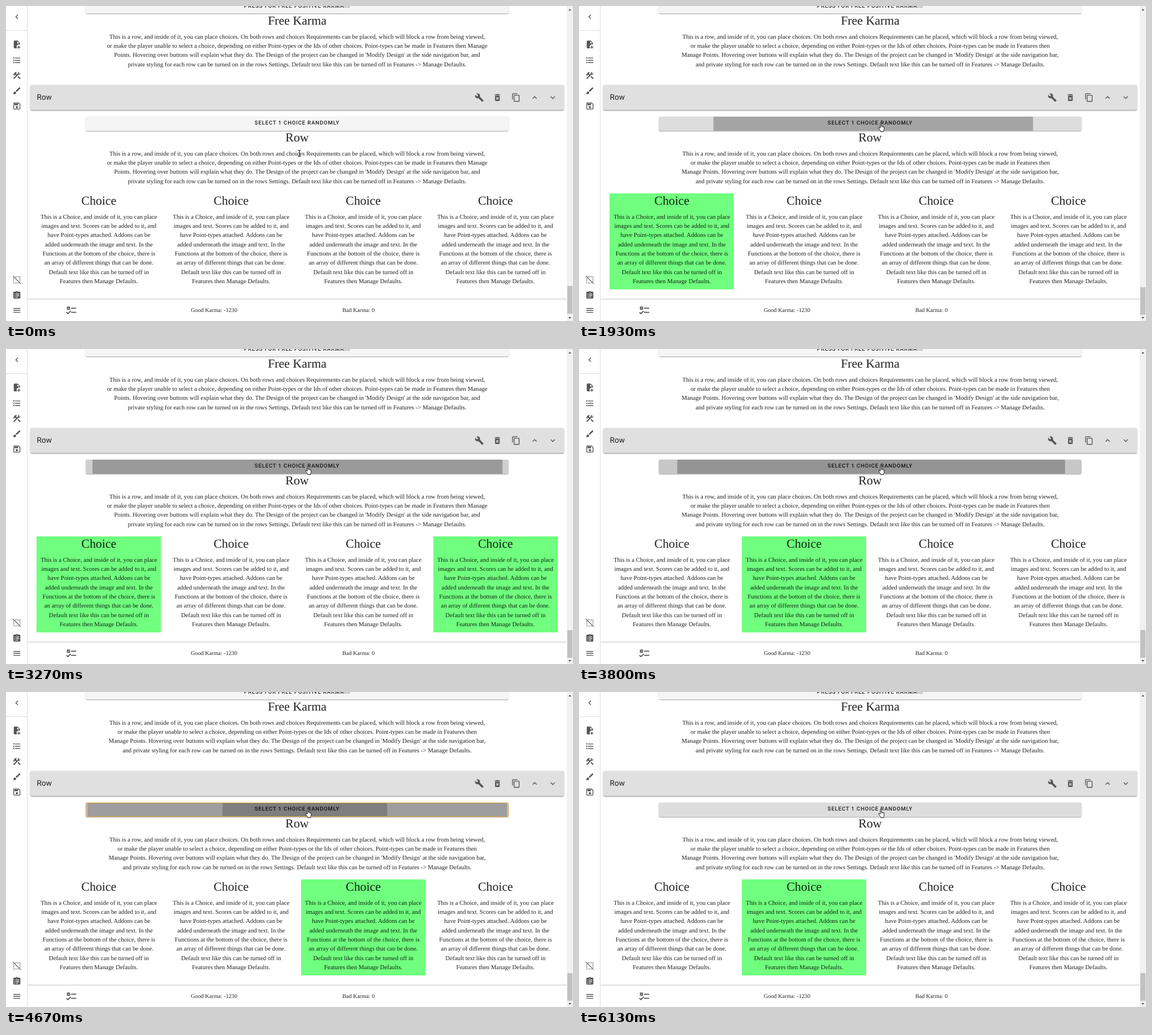
An HTML page for the animation above (6540 ms loop, 1003 by 558 pixels).

```html
<!DOCTYPE html>
<html lang="en">
<head>
<meta charset="utf-8">
<title>Random choice row</title>
<style>
html, body { margin: 0; width: 100%; height: 100%; overflow: hidden; background: #fff; }
#stage { position: absolute; left: 0; top: 0; width: 1003px; height: 558px; overflow: hidden; color: rgba(0,0,0,.87);
  font-family: "Liberation Serif", "Times New Roman", serif; text-rendering: geometricPrecision; }
#stage div, #stage svg { position: absolute; }
.text { font-size: 10.9px; line-height: 16.34px; text-align: center; white-space: nowrap; }
.title { font-size: 21.85px; line-height: 26px; text-align: center; white-space: nowrap; }
.wide { left: 141px; width: 748px; }
.btn { height: 24.5px; border-radius: 2.5px; background: #f5f5f5;
  box-shadow: 0 2px .7px -1.4px rgba(0,0,0,.2), 0 1.4px 1.4px rgba(0,0,0,.14), 0 .7px 3.4px rgba(0,0,0,.12); }
.label { width: 100%; text-align: center; white-space: nowrap; line-height: 24.5px;
  font-family: Roboto, sans-serif; font-weight: 500; font-size: 9.56px; letter-spacing: .0893em; }
.clip { inset: 0; overflow: hidden; border-radius: 2.5px; }
.ripple { left: -374.2px; top: -374.2px; width: 748.4px; height: 748.4px; border-radius: 50%; background: #000; opacity: 0; }
#ring { inset: 0; box-sizing: border-box; border: 1px solid #d79a35; border-radius: 2px; }
.choice { top: 332px; width: 220px; height: 170px; }
.choice .title { top: 0; width: 100%; }
.choice .text { top: 33.5px; width: 100%; }
#panel { left: 43px; top: 140px; width: 944px; height: 44px; background: #e0e0e0; border-radius: 2.5px;
  box-shadow: 0 2px .7px -1.4px rgba(0,0,0,.2), 0 1.4px 1.6px rgba(0,0,0,.2), 0 .7px 3.6px rgba(0,0,0,.2); }
#panel div { left: 11.5px; line-height: 44px; font: 13.6px/44px Roboto, sans-serif; }
#side { left: 0; top: 0; width: 37px; height: 558px; background: #fff; border-right: 1px solid #dedede; }
#side div { left: 0; top: 43px; width: 37px; height: 1px; background: #dedede; }
#foot { left: 38px; top: 520px; width: 954px; height: 38px; background: #fff; box-shadow: 0 -1px 2px rgba(0,0,0,.25); }
#foot div { top: 0; width: 120px; text-align: center; font-size: 10.2px; line-height: 39px; }
#bar { left: 992px; top: 0; width: 11px; height: 558px; background: #f1f1f1; }
#thumb { left: 1px; width: 9px; height: 49px; background: #c1c1c1; }
</style>
</head>
<body>
<div id="stage">
  <div class="btn wide" style="top:-11.5px"><div class="label">PRESS FOR FREE POSITIVE KARMA!!!</div></div>
  <div class="title wide" style="top:13px">Free Karma</div>
  <div class="text wide intro" style="top:46.8px"></div>
  <div id="panel"><div>Row</div></div>
  <div class="btn wide" id="pick" style="top:196px">
    <div class="clip" id="ripples"></div>
    <div id="ring"></div>
    <div class="label">SELECT 1 CHOICE RANDOMLY</div>
  </div>
  <div class="title wide" style="top:220.3px">Row</div>
  <div class="text wide intro" style="top:253.5px"></div>
  <div id="foot"><div style="left:270px">Good Karma: -1230</div><div style="left:525.5px">Bad Karma: 0</div></div>
  <div id="side"><div></div></div>
  <div id="bar">
    <div id="thumb"></div>
    <svg width="11" height="558" fill="#505050"><path d="M3 8h5L5.500 5zM3 551h5l-2.500 3z"/></svg>
  </div>
  <svg id="beam" width="8" height="14" viewBox="-4 -7 8 14" fill="none" stroke="#111" stroke-width="1.1"><path d="M-2.500-5.500Q0-5.500 0-4Q0-5.500 2.500-5.500M0-4.500V4.500M-2.500 5.500Q0 5.500 0 4Q0 5.500 2.500 5.500"/></svg>
  <svg id="hand" width="12" height="18" viewBox="-1 -1 12 18" fill="#fff" stroke="#111" stroke-width=".9" stroke-linejoin="round">
    <path d="M3 9V1.300Q3 .3 3.900 .3T4.800 1.300V5.500Q6.500 5 6.600 6Q8.200 5.600 8.300 6.700Q9.800 6.400 9.800 7.800V11Q9.800 12.500 8.800 13.500V15.500H3.500V14Q2 12.500 .8 10.500L.2 9.200Q0 8 1 8Q2 8 3 9.800"/>
    <path d="M4.800 5.500V8M6.600 6V8.200M8.300 6.700V8.500" stroke-width=".6"/>
  </svg>
</div>
<script>
const $ = id => document.getElementById(id);
const stage = $('stage');

const intro = 'This is a row, and inside of it, you can place choices. On both rows and choices Requirements can be placed, which will block a row from being viewed,<br>' +
  'or make the player unable to select a choice, depending on either Point-types or the Ids of other choices. Point-types can be made in Features then@Manage#' +
  'Points. Hovering over buttons will explain what they do. The Design of the project can be changed in \'Modify Design\' at the side navigation bar,@and#' +
  'private styling for each row can be turned on in the rows Settings. Default text like this can be turned off in Features -&gt; Manage Defaults.';
// The last word of two lines moves down when the row gets narrower.
const wideText = intro.replace(/@/g, ' ').replace(/#/g, '<br>');
const narrowText = intro.replace(/@/g, '<br>').replace(/#/g, ' ');
const intros = document.querySelectorAll('.intro');

const choiceText = ['This is a Choice, and inside of it, you can place', 'images and text. Scores can be added to it, and',
  'have Point-types attached. Addons can be', 'added underneath the image and text. In the',
  'Functions at the bottom of the choice, there is', 'an array of different things that can be done.',
  'Default text like this can be turned off in', 'Features then Manage Defaults.'].join('<br>');

function add(parent, cls) {
  const el = document.createElement('div');
  el.className = cls;
  parent.append(el);
  return el;
}
const choices = [0, 1, 2, 3].map(i => {
  const el = add(stage, 'choice');
  el.style.left = 54.3 + 233.85 * i + 'px';
  el.innerHTML = `<div class="title">Choice</div><div class="text">${choiceText}</div>`;
  return el;
});

function icon(x, y, d, size = 16.4, color = '#555') {
  stage.insertAdjacentHTML('beforeend',
    `<svg viewBox="0 0 24 24" width="${size}" height="${size}" style="left:${x - size / 2}px;top:${y - size / 2}px" fill="${color}" fill-rule="evenodd"><path d="${d}"/></svg>`);
}
icon(837, 162, 'M22.7 19l-9.1-9.1c.9-2.3.4-5-1.5-6.9-2-2-5-2.4-7.4-1.3L9 6 6 9 1.6 4.7C.4 7.1.9 10.1 2.9 12.1c1.9 1.9 4.6 2.4 6.9 1.5l9.1 9.1c.4.4 1 .4 1.4 0l2.3-2.3c.5-.4.5-1.1.1-1.4z');
icon(869.5, 162, 'M6 19c0 1.1.9 2 2 2h8c1.1 0 2-.9 2-2V7H6zM8.460 11.880l1.410-1.410L12 12.590l2.120-2.120 1.410 1.410L13.410 14l2.120 2.120-1.410 1.410L12 15.410l-2.120 2.120-1.410-1.410L10.590 14zM15.500 4l-1-1h-5l-1 1H5v2h14V4z');
icon(902, 162, 'M16 1H4c-1.1 0-2 .9-2 2v14h2V3h12zM19 5H8c-1.1 0-2 .9-2 2v14c0 1.1.9 2 2 2h11c1.1 0 2-.9 2-2V7c0-1.1-.9-2-2-2zM19 21H8V7h11z');
icon(935, 162, 'M12 8l-6 6 1.410 1.410L12 10.830l4.590 4.580L18 14z');
icon(967.3, 162, 'M16.590 8.590L12 13.170 7.410 8.590 6 10l6 6 6-6z');
const sideIcons = [
  [19, 'M15.410 7.410L14 6l-6 6 6 6 1.410-1.410L10.830 12z'],
  [68, 'M13 9h5.500L13 3.500zM6 2h8l6 6v4.500a6 6 0 0 0-7 9.500H6a2 2 0 0 1-2-2V4a2 2 0 0 1 2-2M18 15v3h3v2h-3v3h-2v-3h-3v-2h3v-3z'],
  [96, 'M7 5h14v2H7zM7 11h14v2H7zM7 17h14v2H7zM2.500 4.500h3v3h-3zM2.500 10.500h3v3h-3zM2.500 16.500h3v3h-3z'],
  [123, 'M13.800 15.200l2.100-2.100 6 6-2.100 2.100zM17.500 10a3.500 3.500 0 0 0 3.200-4.900l-2.700 2.700-1.800-1.800 2.700-2.700A3.500 3.500 0 0 0 14.100 7.700l-1.850 1.850-1.800-1.800.7-.7-1.400-1.400L11.900 3.500a3 3 0 0 0-4.250 0L4.100 7.100l1.400 1.400H2.700l-.7.7 3.500 3.500.7-.7V9.200l1.400 1.400.7-.7 1.800 1.800-7.400 7.400 2.100 2.100L16.300 9.700c.4.2.8.3 1.200.3z'],
  [150, 'M20.700 4.600l-1.300-1.300a1 1 0 0 0-1.400 0L9 12.250 11.750 15l8.950-9a1 1 0 0 0 0-1.400zM7 14c-1.660 0-3 1.340-3 3 0 1.300-1.160 2-2 2 .9 1.200 2.500 2 4 2a4 4 0 0 0 4-4c0-1.660-1.340-3-3-3z'],
  [177, 'M17 3H5a2 2 0 0 0-2 2v14a2 2 0 0 0 2 2h14a2 2 0 0 0 2-2V7zM19 19H5V5h11.200L19 7.800zM12 12a3 3 0 1 0 0 6 3 3 0 0 0 0-6M6 6h9v4H6z'],
  [485, 'M2.300 1l20.500 20.500-1.300 1.300L1 2.300zM7 3h2v2H7zM11 3h2v2h-2zM15 3h2v2h-2zM19 3h2v2h-2zM3 7h2v2H3zM3 11h2v2H3zM3 15h2v2H3zM3 19h2v2H3zM7 19h2v2H7zM11 19h2v2h-2zM15 19h2v2h-2zM19 7h2v2h-2zM19 11h2v2h-2zM19 15h2v2h-2z'],
  [512, 'M19 3h-4.200a3 3 0 0 0-5.600 0H5a2 2 0 0 0-2 2v14a2 2 0 0 0 2 2h14a2 2 0 0 0 2-2V5a2 2 0 0 0-2-2M12 3a1 1 0 0 1 0 2 1 1 0 0 1 0-2M6 8h2v2H6zM10 8h8v2h-8zM6 12h2v2H6zM10 12h8v2h-8zM6 16h2v2H6zM10 16h5v2h-5z'],
  [539, 'M3 18h18v-2H3zM3 13h18v-2H3zM3 6v2h18V6z']
];
for (const [y, d] of sideIcons) icon(19, y, d);
icon(116, 539, 'M3 5h6v6H3zM5 7v2h2V7zM11 7h10v2H11zM11 15h10v2H11zM5 20l-3.500-3.500 1.400-1.400L5 17.200l4.600-4.600L11 14z', 22);
stage.append($('beam'), $('hand'));

// Each press: time in ms and the choice it toggles.
const presses = [[1060, 0], [1857, 2], [2090, 1], [2300, 2], [2510, 1], [2708, 3], [2895, 0], [3085, 0], [3275, 1], [3466, 0],
  [3659, 3], [3860, 3], [4060, 2], [4255, 3], [4449, 1], [4658, 0], [4830, 3], [4994, 1], [5149, 2], [5331, 0], [5605, 3]];
const ripples = presses.map(() => add($('ripples'), 'ripple'));

const LOOP = 6540, STEP = 200 / 3;
const clamp = v => Math.min(1, Math.max(0, v));

// cubic-bezier(0, 0, .2, 1)
function ease(x) {
  let lo = 0, hi = 1;
  for (let i = 0; i < 20; i++) {
    const s = (lo + hi) / 2;
    if (.6 * s * s + .4 * s ** 3 < x) lo = s; else hi = s;
  }
  return 3 * lo * lo - 2 * lo ** 3;
}

function drawRipple(el, age) {
  const on = age >= 0 && age < 550;
  el.style.visibility = on ? 'visible' : 'hidden';
  if (!on) return;
  const p = ease(clamp(age / 250)), fade = ease(clamp((age - 250) / 300));
  const x = 389.5 - 15.5 * p, y = 18 - 5.75 * p;
  el.style.transform = `translate(${x}px,${y}px) scale(${.3 + .7 * p})`;
  el.style.opacity = .26 * clamp(.7 + age / 100) * (1 - fade);
}

// Pointer stops: time, x, y, and whether it is the hand.
const stops = [[0, 519, 261, 0], [130, 521, 251, 0], [200, 526, 233, 0], [265, 534, 215, 1], [330, 533.5, 214.5, 1], [470, 534.5, 214, 1], [530, 534.5, 215, 1]];
function drawPointer(t) {
  const [, x, y, hand] = stops.filter(s => s[0] <= t).pop();
  $('beam').style.visibility = hand ? 'hidden' : 'visible';
  $('hand').style.visibility = hand ? 'visible' : 'hidden';
  const el = hand ? $('hand') : $('beam');
  el.style.left = x - (hand ? 6 : 4) + 'px';
  el.style.top = y - (hand ? 9 : 7) + 'px';
}

let shownText;
function draw(time) {
  const t = Math.floor((time % LOOP + 4) / STEP) * STEP;
  const picked = [false, false, false, false];
  let focus = false;
  presses.forEach(([at, choice], i) => {
    const age = t - at;
    drawRipple(ripples[i], age);
    if (age >= 100) picked[choice] = !picked[choice];
    if (age >= 0 && age < 65) focus = true;
  });
  choices.forEach((el, i) => el.style.background = picked[i] ? '#70ff7e' : '');
  const text = picked.filter(Boolean).length === 1 ? narrowText : wideText;
  if (text !== shownText) {
    intros.forEach(el => el.innerHTML = text);
    shownText = text;
  }
  const grey = 245 - 24 * clamp((t - 1000) / 200);
  $('pick').style.background = t < 1060 ? '#f5f5f5' : `rgb(${grey},${grey},${grey})`;
  $('ring').style.visibility = focus ? 'visible' : 'hidden';
  $('thumb').style.top = (t < 1160 ? 496 : 497.5) + 'px';
  drawPointer(t);
}

const start = performance.now();
function tick() {
  draw(performance.now() - start);
  requestAnimationFrame(tick);
}
tick();
</script>
</body>
</html>
```
